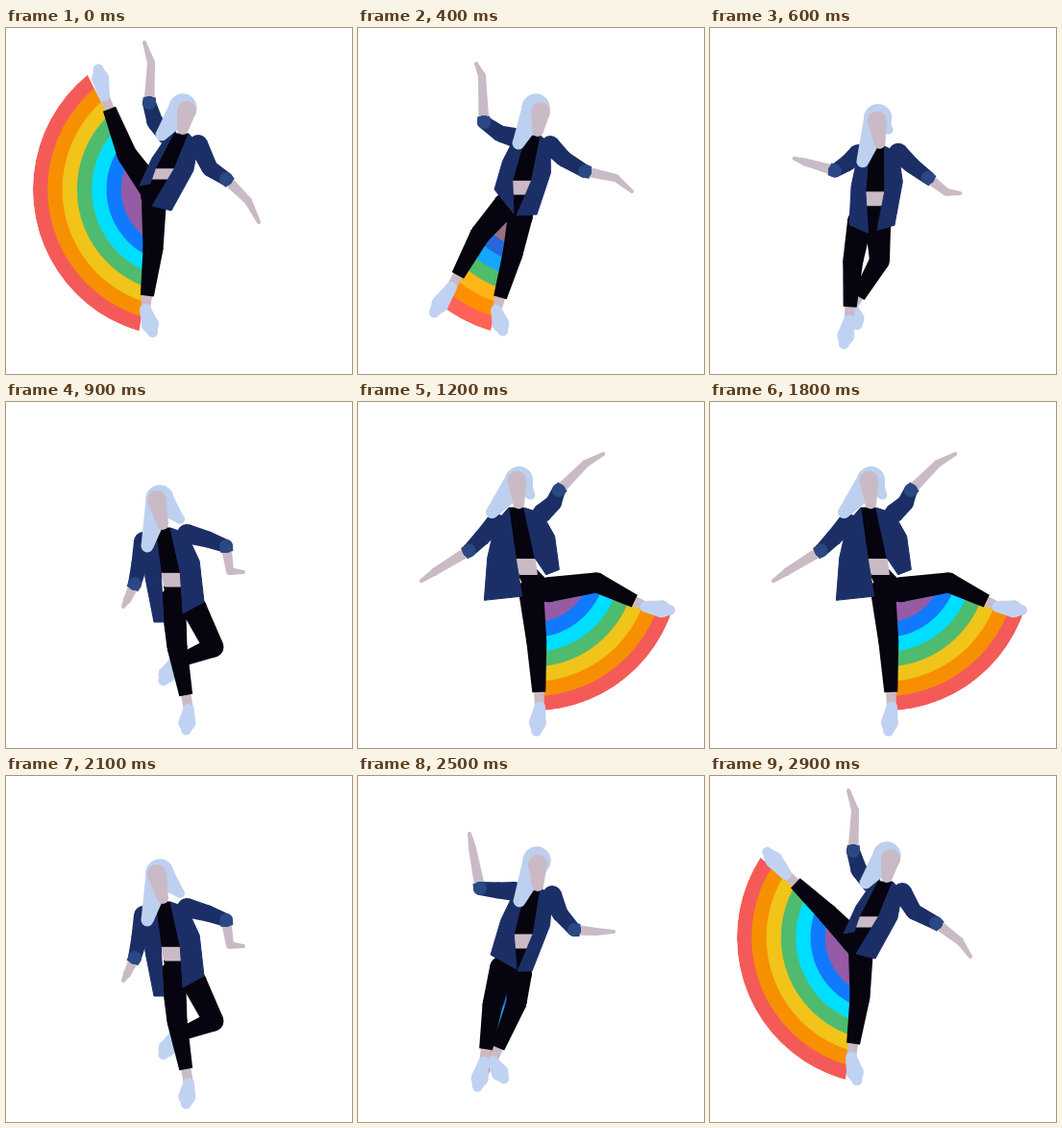
An HTML page with a canvas for the animation above (3 s loop, 360 by 360 pixels).

```html
<!DOCTYPE html>
<html lang="en">
<head>
<meta charset="utf-8">
<title>Rainbow kick</title>
<style>
html, body { margin: 0; width: 100%; height: 100%; overflow: hidden; background: #fff; }
canvas { display: block; width: 360px; height: 360px; }
</style>
</head>
<body>
<canvas id="stage" width="360" height="360"></canvas>
<script>
const ctx = document.getElementById('stage').getContext('2d');
const STEP = 100, STEPS = 30;
const BLACK = '#06040e', NAVY = '#1c2e66', CUFF = '#2a4883';
const SKIN = '#cabac6', HAIR = '#bdd0f0', SHOE = '#c0d2f2';
const WIDE = ['#f45b58', '#f79000', '#f0c419', '#4fbb6f', '#00deff', '#0f7aff', '#955ba5'];
const NARROW = ['#ff6257', '#ff8f00', '#ffb516', '#4fbc6a', '#13a8ff', '#2468dc', '#96717f'];
const CENTER = [181.5, 168], RADIUS = 153.5, BAND = 15.3;

// Joints. head: crown, brow, chin, two hair tips; body: neck, waist;
// coat: outer and inner hem, left then right;
// arms: shoulder, elbow, cuff, wrist, fingertip; legs: hip, knee, ankle, toe.
const kickLeft = {
  head: [[184,83], [188,86], [184,105], [162,111], [190,88]],
  body: [[182,112], [160,157]],
  coat: [[139,164], [150,162], [172,190], [152,185]],
  armL: [[168,112], [155,98], [149,78], [151,36], [144,15]],
  armR: [[200,121], [212,146], [229,157], [252,180], [263,202]],
  legL: [[152,168], [126,132], [102,70], [95,38]],
  legR: [[154,180], [153,230], [145,293], [154,321]]
};
const kickLower = {
  ...kickLeft,
  armR: [[200,121], [212,141], [235,153], [260,172], [271,188]],
  legL: [[150,172], [122,143], [79,102], [56,75]],
  legR: [[157,180], [156,230], [147,293], [154,321]]
};
const landing = {
  head: [[185,83], [190,87], [187,107], [167,120], [191,90]],
  body: [[182,114], [167,173]],
  coat: [[142,168], [162,193], [186,194], [165,195]],
  armL: [[163,114], [148,110], [131,98], [129,50], [123,37]],
  armR: [[200,122], [214,136], [236,149], [268,156], [285,170]],
  legL: [[154,184], [127,215], [97,270], [76,301]],
  legR: [[169,195], [161,235], [144,294], [152,319]]
};
const together = {
  head: [[186,88], [187,92], [187,114], [168,130], [189,93]],
  body: [[182,119], [169,179]],
  coat: [[138,186], [165,201], [181,203], [166,203]],
  armL: [[163,120], [146,119], [127,117], [119,75], [116,60]],
  armR: [[202,124], [210,143], [225,160], [248,162], [266,162]],
  legL: [[150,200], [140,238], [131,298], [123,328]],
  legR: [[168,205], [165,236], [140,297], [154,318]]
};
const tuck = {
  head: [[160,101], [157,102], [163,127], [147,150], [181,122]],
  body: [[163,133], [174,192]],
  coat: [[154,229], [164,229], [206,208], [184,220]],
  armL: [[143,145], [139,168], [134,189], [126,206], [122,213]],
  armR: [[188,137], [210,143], [229,150], [233,176], [247,177]],
  legL: [[174,205], [178,255], [190,320], [187,345]],
  legR: [[196,215], [216,255], [174,272], [162,293]]
};
const kickRight = {
  head: [[169,78], [167,78], [168,101], [138,108], [179,92]],
  body: [[165,108], [178,177]],
  coat: [[127,202], [172,197], [210,168], [198,172]],
  armL: [[143,122], [127,136], [112,148], [70,168], [54,177]],
  armR: [[192,112], [202,98], [205,81], [220,42], [240,26]],
  legL: [[184,190], [191,245], [188,316], [183,348]],
  legR: [[200,182], [230,137], [270,72], [283,40]]
};
const kickHigh = {
  ...kickRight,
  armR: [[192,112], [202,98], [205,81], [217,36], [236,19]],
  legR: [[199,182], [224,130], [258,62], [270,30]]
};
const poses = { 0: kickLeft, 1: kickLower, 4: landing, 5: together, 9: tuck, 14: kickRight, 15: kickHigh };
const beats = Object.keys(poses).map(Number);

const mix = (a, b, u) => [a[0] + (b[0] - a[0]) * u, a[1] + (b[1] - a[1]) * u];
const shift = (p, dx, dy = 0) => [p[0] + dx, p[1] + dy];
const angle = (from, to) => Math.atan2(to[1] - from[1], to[0] - from[0]);

// Turns the joints after the pivot around it, the short way.
function swing(a, b, pivot, u) {
  const root = mix(a[pivot], b[pivot], u);
  return a.map((p, i) => {
    if (i <= pivot) return mix(p, b[i], u);
    const start = angle(a[pivot], p), turn = angle(b[pivot], b[i]) - start;
    const dir = start + Math.atan2(Math.sin(turn), Math.cos(turn)) * u;
    const size = (q, o) => Math.hypot(q[0] - o[0], q[1] - o[1]);
    const len = size(p, a[pivot]) * (1 - u) + size(b[i], b[pivot]) * u;
    return [root[0] + Math.cos(dir) * len, root[1] + Math.sin(dir) * len];
  });
}

function poseAt(beat) {
  const from = beats.filter(b => b <= beat).pop();
  const to = beats.find(b => b > beat) ?? from;
  const u = to > from ? (beat - from) / (to - from) : 0;
  const out = u * (2 - u), a = poses[from], b = poses[to];
  const glide = key => a[key].map((p, i) => mix(p, b[key][i], out));
  return {
    head: glide('head'), body: glide('body'), coat: glide('coat'),
    armL: swing(a.armL, b.armL, 2, out), armR: swing(a.armR, b.armR, 2, out),
    legL: swing(a.legL, b.legL, 0, u), legR: swing(a.legR, b.legR, 0, u)
  };
}

function poly(color, ...pts) {
  ctx.beginPath();
  pts.forEach(p => ctx.lineTo(...p));
  ctx.closePath();
  ctx.fillStyle = ctx.strokeStyle = color;
  ctx.lineWidth = 1;
  ctx.lineJoin = 'round';
  ctx.fill();
  ctx.stroke();
}

// A tapering tube through the points; a flat one has no cap at its end.
function limb(color, pts, radii, flat) {
  ctx.fillStyle = color;
  pts.forEach((p, i) => {
    const r = radii[i], q = pts[i + 1];
    if (q) {
      const dir = angle(p, q), s = Math.sin(dir), c = Math.cos(dir), e = radii[i + 1];
      ctx.beginPath();
      ctx.moveTo(p[0] - s * r, p[1] + c * r);
      ctx.lineTo(q[0] - s * e, q[1] + c * e);
      ctx.lineTo(q[0] + s * e, q[1] - c * e);
      ctx.lineTo(p[0] + s * r, p[1] - c * r);
      ctx.fill();
    } else if (flat) return;
    ctx.beginPath();
    ctx.arc(...p, r, 0, 7);
    ctx.fill();
  });
}

function leg([hip, knee, ankle, toe]) {
  limb(SKIN, [knee, ankle], [6, 5]);
  limb(SHOE, [ankle, mix(ankle, toe, 0.55), mix(ankle, toe, 0.84)], [6, 9, 5.5]);
  limb(BLACK, [hip, knee, mix(knee, ankle, 0.77)], [13, 10.5, 7], true);
}

function arm([shoulder, elbow, cuff, wrist, tip]) {
  limb(SKIN, [cuff, wrist, tip], [5.5, 4, 2]);
  limb(NAVY, [shoulder, elbow, cuff], [10, 8.5, 7]);
  const dir = angle(cuff, wrist);
  limb(CUFF, [cuff, shift(cuff, 6 * Math.cos(dir), 6 * Math.sin(dir))], [7, 6.5], true);
}

function rainbow(kick, stand) {
  const a = angle(CENTER, kick[2]), b = angle(CENTER, stand[2]);
  const turn = Math.atan2(Math.sin(b - a), Math.cos(b - a));
  const colors = Math.abs(turn) < 0.6 ? NARROW : WIDE;
  ctx.save();
  ctx.beginPath();
  ctx.moveTo(...kick[0]);
  ctx.lineTo(...kick[1]);
  ctx.arc(...CENTER, RADIUS, a, b, turn < 0);
  ctx.lineTo(...stand[1]);
  ctx.lineTo(...stand[0]);
  ctx.clip();
  colors.forEach((c, i) => {
    ctx.beginPath();
    ctx.arc(...CENTER, RADIUS - i * BAND, 0, 7);
    ctx.fillStyle = c;
    ctx.fill();
  });
  ctx.restore();
}

function torso({ body: [neck, belt], coat: [outL, inL, outR, inR], armL, armR }) {
  const waist = mix(neck, belt, 0.75);
  const collarL = shift(neck, -8, -2), collarR = shift(neck, 8, -2);
  const waistL = shift(waist, -10), waistR = shift(waist, 10);
  poly(SKIN, waistL, waistR, shift(belt, 9), shift(belt, -9));
  arm(armL);
  arm(armR);
  poly(BLACK, collarL, collarR, waistR, waistL);
  poly(NAVY, collarL, armL[0], shift(mix(armL[0], outL, 0.45), -3), outL, inL, waistL);
  poly(NAVY, collarR, armR[0], shift(mix(armR[0], outR, 0.4), 6), outR, inR, waistR);
}

function head([crown, brow, chin, tipL, tipR]) {
  limb(HAIR, [crown, tipL], [14.5, 6.5]);
  limb(HAIR, [crown, tipR], [14.5, 5]);
  limb(SKIN, [brow, chin], [10, 6]);
}

function draw(now) {
  const step = Math.floor(now / STEP) % STEPS;
  const beat = Math.min(step, STEPS - step);
  const pose = poseAt(beat), { legL, legR, body } = pose;
  ctx.fillStyle = '#fff';
  ctx.fillRect(0, 0, 360, 360);
  if (beat < 6) rainbow(legL, legR);
  if (beat > 10) rainbow(legR, legL);
  leg(legR);
  leg(legL);
  limb(BLACK, [body[1], mix(legL[0], legR[0], 0.5)], [10, 13]);
  torso(pose);
  head(pose.head);
  requestAnimationFrame(draw);
}
requestAnimationFrame(draw);
</script>
</body>
</html>
```
